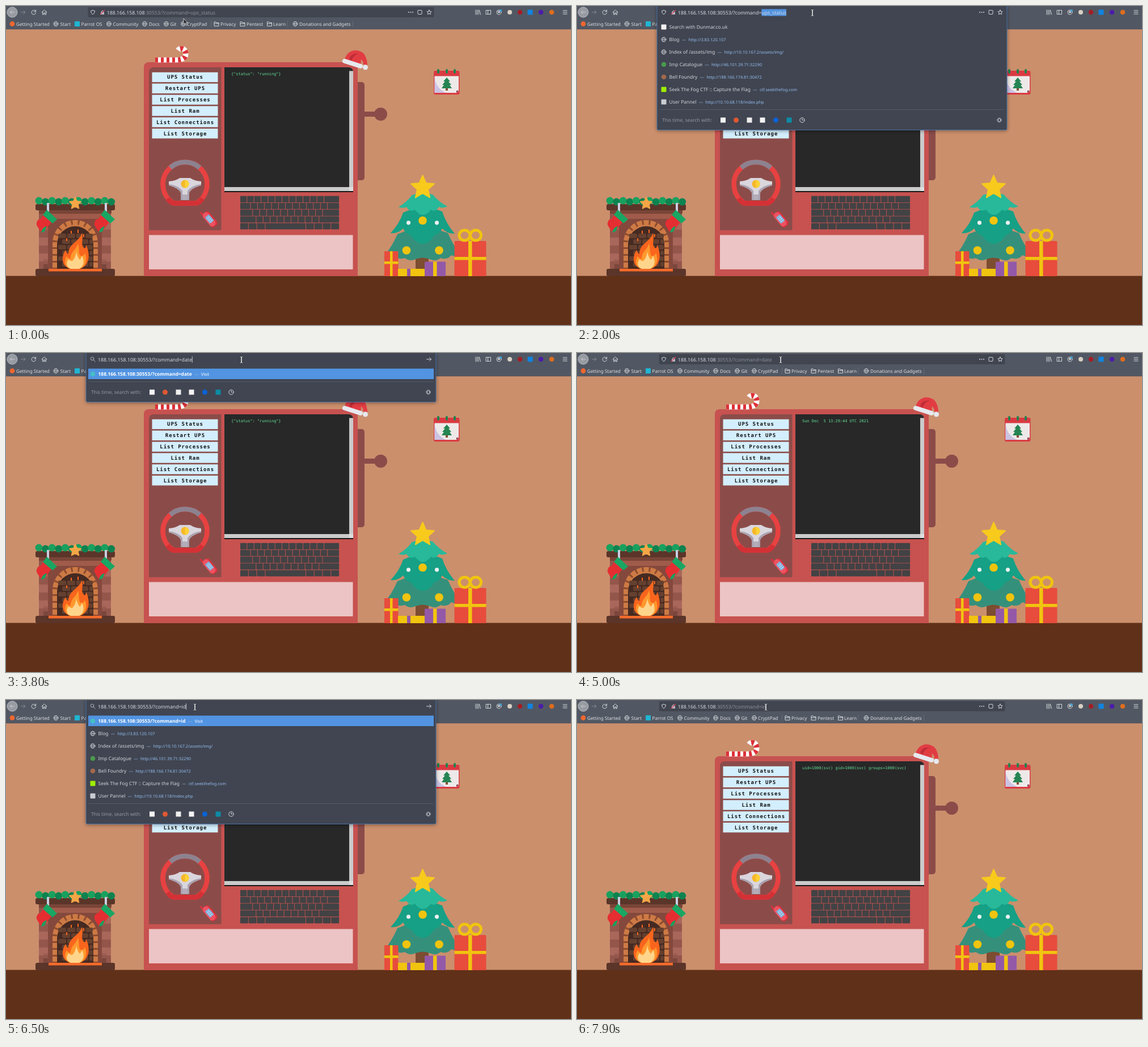
These frames come from a looping animation (996 by 562 pixels, 8000 ms). An HTML page:

```html
<!DOCTYPE html>
<html lang="en">
<head>
<meta charset="utf-8">
<title>Workshop console</title>
<style>
html, body { margin: 0; width: 100%; height: 100%; overflow: hidden; background: #cb8f6c; }
svg { display: block; width: 100vw; height: 100vh; }
text { font-family: "Noto Sans", sans-serif; text-rendering: geometricPrecision; white-space: pre; }
.marks { font-size: 8.2px; fill: #dcdfe4; }
.url { font-size: 8.73px; fill: #d6d9df; }
.row { font-size: 8.45px; fill: #d0d4da; }
.link { font-size: 7.4px; fill: #93bbec; }
.term { font: 6.94px "DejaVu Sans Mono", monospace; fill: #62df95; }
.btn { font: bold 9px "DejaVu Sans Mono", monospace; letter-spacing: .97px; text-anchor: middle; fill: #111; }
.line { fill: none; stroke: #d3d6db; stroke-width: 1; stroke-linecap: round; stroke-linejoin: round; }
#box { filter: drop-shadow(0 1px 3px #0006); }
</style>
</head>
<body>
<svg viewBox="0 0 996 562">
  <rect y="41" width="996" height="435" fill="#cb8f6c"/>
  <rect y="475.5" width="996" height="87" fill="#603018"/>

  <!-- fireplace -->
  <g>
    <rect x="58" y="355" width="127" height="110" fill="#84483c"/>
    <g id="pillars"></g>
    <path d="M82 464V417a40 40 0 0 1 80 0V464Z" fill="#cd7a45"/>
    <path d="M86 464V417a36 36 0 0 1 72 0V464" fill="none" stroke="#8d4b2d" stroke-width="8" stroke-dasharray="3 9"/>
    <path d="M90 464V420a32 32 0 0 1 64 0V464Z" fill="#452a22"/>
    <g id="bricks" fill="#65402f"></g>
    <path d="M134 400C137 412 131 418 137 426Q141 428 141 421C150 437 148 464 122 464C99 464 95 445 105 430Q107 436 110 437C110 418 128 417 134 400Z" fill="#f9651d"/>
    <path d="M127 418C130 430 127 434 131 440Q137 442 139 435C145 450 139 464 122 464S100 452 107 441Q110 446 114 445C114 432 124 430 127 418Z" fill="#ff982d"/>
    <path d="M124 432Q125 441 130 447Q133 444 134 440C140 452 136 464 122 464S104 456 110 446Q113 450 117 449Q123 443 124 432Z" fill="#ffd58c"/>
    <path d="M115 396v5M127 394v6M137 402v5M107 409v5" stroke="#f9651d" stroke-width="2"/>
    <rect x="58" y="359" width="128" height="7" rx="2" fill="#794538"/>
    <rect x="52" y="349" width="140" height="11" rx="3" fill="#5b3529"/>
    <rect x="52" y="463" width="140" height="13" rx="3" fill="#5b3529"/>
    <rect x="75" y="463" width="94" height="4.5" fill="#f56b2b"/>
    <g id="garland"></g>
    <g id="sock">
      <path d="M74 347v15" stroke="#c9cfe2" stroke-width="4"/>
      <path d="M67 366L81 380Q76 385 70 395Q65 401 60 396L54 386Q53 376 61 375Z" fill="#e52e32"/>
      <path d="M72 388l-3 8q-4 4-7 2Q65 389 72 388Z" fill="#18a15e"/>
      <path d="M72 359L90 376L82 383L65 368Z" fill="#19a663"/>
    </g>
    <use href="#sock" x="102"/>
  </g>

  <!-- console -->
  <path d="M243 476V107a8 8 0 0 1 8-8H612a8 8 0 0 1 8 8V476Z" fill="#c75250"/>
  <path d="M252 395V116a8 8 0 0 1 8-8H379.500V395Z" fill="#8b4c49"/>
  <path d="M620 134h7a5 5 0 0 1 5 5V302a5 5 0 0 1-5 5h-7ZM632 186h22v9h-22Z" fill="#8b4c49"/>
  <circle cx="660.500" cy="190.500" r="11.500" fill="#8b4c49"/>
  <g id="buttons"></g>
  <path d="M385 328V108H604a8 8 0 0 1 8 8V328Z" fill="#282828"/>
  <path d="M605 114.500h7V319h-7ZM385 319h220v7H385Z" fill="#cbcaca"/>
  <path d="M605 319h7v7h-7Z" fill="#dedede"/>
  <path d="M385 326h227v2H385Z" fill="#151515"/>
  <text id="out" class="term" x="397" y="121.700"></text>
  <g id="keys" fill="#424244"></g>
  <rect x="252" y="403.500" width="359.500" height="60.500" fill="#ecc4c5"/>
  <g fill="none" stroke-width="8.500">
    <path d="M295.500 347.500H335.500A39 39 0 1 0 295.500 347.500Z" stroke="#e84141"/>
    <path d="M285 339Q290 347.500 297 347.500H334Q341 347.500 346 339" stroke="#d43136"/>
    <path d="M289.500 285A39 39 0 0 1 341.500 285" stroke="#8d8290"/>
  </g>
  <path d="M287 309Q300 308 306 303H325Q331 308 344 309V316Q326 321 323 329V342H308V329Q305 321 287 316Z" fill="#dad6dd"/>
  <path d="M287 314Q304 316 311 326V342H308V329Q305 321 287 316ZM344 314Q327 316 320 326V342H323V329Q326 321 344 316Z" fill="#aaa2b0"/>
  <path d="M311 332h9v10h-9Z" fill="#b4adb9"/>
  <circle cx="315.500" cy="313.500" r="7" fill="#f6b729"/>
  <path d="M315.500 306.500a7 7 0 0 1 0 14Z" fill="#fbd236"/>
  <g transform="rotate(-40 359 375)">
    <rect x="352.500" y="355" width="3" height="10" rx="1.500" fill="#d9333f"/>
    <rect x="352" y="361" width="14" height="30" rx="5" fill="#d9333f"/>
    <rect x="352" y="361" width="11.500" height="28" rx="5" fill="#ef5260"/>
    <rect x="354" y="368" width="9" height="14" fill="#77a9d6"/>
    <path d="M354 372.500h9M354 376h9M354 379.500h9M357 368v14M360 368v14" stroke="#d5e9f8" stroke-width=".7"/>
  </g>
  <g fill="none" stroke-width="9">
    <path d="M263 95H300Q317 95 317 84Q316 75 309 75Q305 75 303 78" stroke="#fff"/>
    <path d="M263 95H300Q317 95 317 84Q316 75 309 75Q305 75 303 78" stroke="#dd3038" stroke-dasharray="5 5"/>
  </g>
  <path d="M596 97Q600 80 615 78Q636 78 637 104L630 103Q630 97 626 94L625 106Z" fill="#e23c43"/>
  <path d="M605 92Q610 82 622 84Q612 86 609 97Z" fill="#bd2d37"/>
  <path d="M597 97L625 106" stroke="#e6e9ef" stroke-width="8" stroke-linecap="round"/>
  <circle cx="633.500" cy="108" r="4.500" fill="#e6e9ef"/>

  <!-- calendar -->
  <rect x="754" y="114" width="45.500" height="42" rx="3" fill="#da3a42"/>
  <path d="M755.500 123.500H798V150L794 153H755.500Z" fill="#eee9e9"/>
  <path d="M755.500 123.500Q757 145 776 153H755.500Z" fill="#cbc3e3"/>
  <path d="M798 149h-4v4Z" fill="#7c3448"/>
  <g fill="#22824f"><rect x="760" y="111" width="4" height="8" rx="2"/><rect x="775" y="111" width="4" height="8" rx="2"/><rect x="789" y="111" width="4" height="8" rx="2"/></g>
  <path d="M775 144h4v5h-4Z" fill="#855035"/>
  <path d="M777 126L783 133H780L785 139H782L786 145H768L772 139H769L774 133H771Z" fill="#248452"/>

  <!-- tree -->
  <path d="M722 438h23v38h-23Z" fill="#7d4d31"/>
  <path d="M734 385L690 402Q680 425 666 441Q680 443 685 439Q690 448 703 444Q712 451 722 446Q734 441 747 446Q757 451 766 444Q778 448 785 439Q794 443 803 441Q790 425 779 400Z" fill="#35907b"/>
  <path d="M734 350L700 364Q694 383 678 400Q690 402 700 392Q705 402 714 404Q722 418 735 419Q747 418 755 404Q764 402 769 392Q779 402 791 401Q776 384 769 362Z" fill="#16a085"/>
  <path d="M734 328L716 333Q706 346 692 354Q700 357 706 354Q712 364 721 359Q728 368 735 368Q742 368 749 359Q757 364 763 354Q770 357 778 353Q764 346 752 332Z" fill="#27b99a"/>
  <g id="baubles"></g>

  <!-- presents -->
  <rect x="790.500" y="414" width="56" height="62" rx="2" fill="#e74c3c"/>
  <path d="M790.500 442h56v5.500h-56ZM815 414h6.500v62H815Z" fill="#f1c40f"/>
  <g fill="none" stroke="#f1c40f" stroke-width="5"><ellipse cx="808.500" cy="404" rx="9.500" ry="9"/><ellipse cx="828" cy="404" rx="9.500" ry="9"/></g>
  <rect x="667" y="432" width="24.500" height="44" rx="1" fill="#e74c3c"/>
  <path d="M667 450h24.500v4.500H667ZM677 432h4.500v44H677Z" fill="#f1c40f"/>
  <path d="M691 463h47v13h-47Z" fill="#f1c40f"/><path d="M707 463h6v13h-6Z" fill="#9058a6"/>
  <rect x="738" y="450.500" width="37" height="25.500" rx="1" fill="#9359a8"/>
  <path d="M753 450.500h6.500V476H753Z" fill="#f1c40f"/>

  <!-- browser bars -->
  <rect width="996" height="41" fill="#525863"/>
  <path d="M0 40.700h996" stroke="#4a4f5a" stroke-width=".6"/>
  <circle cx="11" cy="11" r="9" fill="#979ba2" stroke="#b9bcc1"/>
  <g class="line">
    <path d="M15 11H7.500M10.500 8l-3 3 3 3" stroke="#c9ccd0"/>
    <path d="M26.500 11H34M31 8l3 3-3 3" stroke="#858a93"/>
    <path id="reload" d="M51.600 8.500A3.800 3.800 0 1 0 52.600 12M52.500 7v3h-3"/>
    <path id="stop" d="M46 8l6 6M52 8l-6 6"/>
    <path d="M63 11l4.500-4 4.500 4M64.500 10.500V15h2v-3h2v3h2v-4.500"/>
    <path d="M828 7v8M830.500 7v8M833 7v8M834.500 7.500l2 7.500M846.500 7.500h8v7h-8ZM849.500 7.500v7M982 8h7M982 11h7M982 14h7"/>
    <circle cx="869" cy="11" r="4"/>
  </g>
  <circle cx="869" cy="10.500" r="2" fill="#d3d6db"/><circle cx="872" cy="8" r="2" fill="#3fa9e0"/>
  <circle cx="888" cy="11" r="4" fill="#d9d0c4"/>
  <circle cx="906" cy="11" r="4.200" fill="#a51d26"/>
  <rect x="919.500" y="6.500" width="9" height="9" fill="#1183e0"/>
  <circle cx="943" cy="11" r="4.300" fill="#4c1cab"/>
  <circle cx="962" cy="11" r="4.300" fill="#dd6d1e"/>
  <g id="bookmarks" class="marks"></g>

  <!-- address bar and its list -->
  <rect x="144.500" y="2" width="610" height="18" rx="2" fill="#404550"/>
  <g id="panel">
    <rect id="box" x="141" y="-3" width="617" rx="2.500" fill="#404551" stroke="#4f82c4" stroke-width=".8"/>
    <g id="list"></g>
  </g>
  <g id="site">
    <path class="line" d="M153 7.500q2 1 3.500 1 0 4.500-3.500 6.500-3.500-2-3.500-6.500 1.500 0 3.500-1Z"/>
    <rect x="167" y="10.500" width="6" height="4.500" fill="#b6bac1"/>
    <path class="line" d="M168.500 10.500v-1q1.500-3 3 0v1" stroke="#b6bac1"/>
    <path d="M166 15l8-8" stroke="#e2455e" stroke-width="1.200"/>
    <g fill="#d3d6db"><circle cx="710" cy="11" r="1"/><circle cx="713.500" cy="11" r="1"/><circle cx="717" cy="11" r="1"/></g>
    <rect x="726" y="7.500" width="7" height="7" rx="1" class="line"/>
    <path id="fav" class="line"/>
  </g>
  <g id="search" class="line"><circle cx="152" cy="10" r="2.800" stroke="#aeb2b9"/><path d="M154.300 12.300l3 3" stroke="#aeb2b9"/></g>
  <path id="go" class="line" d="M741.500 11h8M746.500 8l3 3-3 3"/>
  <rect id="sel" y="5.500" height="12" fill="#5294e2"/>
  <text id="url" class="url" y="14.500"><tspan>188.166.158.108</tspan><tspan id="rest"></tspan></text>
  <path id="caret" stroke="#e7e9ec" stroke-width=".8"/>

  <g id="status">
    <path d="M0 549.500H118q4 0 4 4V562H0Z" fill="#404550" stroke="#2f333c"/>
    <text x="4" y="559" style="font-size:7.6px" fill="#c9cdd3">Waiting for 188.166.158.108…</text>
  </g>

  <g id="mouse">
    <path id="arrow" d="M0 0V10.500L2.500 8.200 4.300 12.200 6 11.400 4.300 7.500H7.500Z" fill="#2b2d33" stroke="#e6e6e6" stroke-width=".8"/>
    <g id="beam" fill="none">
      <path d="M-2.200-5.500Q0-5.500 0-4V4Q0 5.500-2.200 5.500M2.200-5.500Q0-5.500 0-4V4Q0 5.500 2.200 5.500" stroke="#20242b" stroke-width="2.400"/>
      <path d="M-2.200-5.500Q0-5.500 0-4V4Q0 5.500-2.200 5.500M2.200-5.500Q0-5.500 0-4V4Q0 5.500 2.200 5.500" stroke="#fff"/>
    </g>
  </g>
</svg>
<script>
const $ = id => document.getElementById(id);
const rect = (x, y, w, h, fill, r = 0) =>
  `<rect x="${x}" y="${y}" width="${w}" height="${h}" rx="${r}"${fill ? ` fill="${fill}"` : ''}/>`;
const dot = (x, y, r, fill) => `<circle cx="${x}" cy="${y}" r="${r}" fill="${fill}"/>`;
const range = n => [...Array(n).keys()];
const globe = (x, y) => `<g class="line" style="stroke-width:.8"><circle cx="${x}" cy="${y}" r="4"/>
  <ellipse cx="${x}" cy="${y}" rx="1.800" ry="4"/><path d="M${x - 4} ${y}h8"/></g>`;
const folder = (x, y) => `<path class="line" d="M${x - 4} ${y + 3.500}v-7h3l1 1.500h4v5.500ZM${x - 4} ${y - .5}h8"/>`;
const starPath = (x, y, R, r) => 'M' + range(10).map(i => {
  const a = i * Math.PI / 5 - Math.PI / 2, d = i % 2 ? r : R;
  return `${x + d * Math.cos(a)} ${y + d * Math.sin(a)}`;
}).join('L') + 'Z';
const star = (x, y, R, r, fill) =>
  `<path d="${starPath(x, y, R, r)}" fill="${fill}" stroke="${fill}" stroke-width="2" stroke-linejoin="round"/>`;

function drawScene() {
  $('pillars').innerHTML = [58, 169].map(x => range(7).map(i =>
    rect(x, 366 + i * 14, 16, 14, i % 2 ? '#a9665a' : '#94564b') +
    rect(x === 58 ? 66 : x, 404 + i * 8.500, 8, 8, i % 2 ? '#9b5d52' : '#7b473d')).join('')).join('')
    + rect(66, 366, 112, 9, '#a05b4a');
  $('bricks').innerHTML = range(6).map(r => range(4).map(c => {
    const x = 92 + c * 16 + r % 2 * 7;
    return rect(x, 401 + r * 10, Math.min(14, 153 - x), 8, '', 2);
  }).join('')).join('');
  $('garland').innerHTML = range(12).map(i =>
    dot(58 + i * 11.600, 343 + i % 2 * 2, 6.500, i % 2 ? '#0d8350' : '#18a15e')).join('')
    + star(122, 348, 10.500, 5, '#f4a647');

  const labels = ['UPS Status', 'Restart UPS', 'List Processes', 'List Ram', 'List Connections', 'List Storage'];
  $('buttons').innerHTML = labels.map((s, i) => {
    const y = 116.800 + i * 19.850;
    return rect(257.500, y, 116, 17.300, '#d3eefd') + `<text class="btn" x="316" y="${y + 11.600}">${s}</text>`;
  }).join('');

  // each key row: widths in units, filled to the same total
  const ones = n => Array(n).fill(1);
  const rows = [[...ones(12), 2.200], [1.500, ...ones(11), 1.700], [1.800, ...ones(10), 2.400],
    [2.300, ...ones(9), 2.900], [1.200, 1.200, 1.200, 5.800, 1.200, 1.200, 1.200, 1.200]];
  $('keys').innerHTML = rows.map((row, i) => {
    const unit = 175 / row.reduce((a, b) => a + b);
    let x = 413;
    return row.map(w => {
      const key = rect(x, 334.800 + i * 11.900, w * unit - .9, 11.100, '', .8);
      x += w * unit;
      return key;
    }).join('');
  }).join('');

  $('baubles').innerHTML = star(734.500, 320, 21.500, 10, '#f8ca1c') + dot(734.500, 378, 7.300, '#f1c40f')
    + [706, 763.500].map(x => dot(x, 430.500, 7.300, '#f1c40f')).join('')
    + [709.500, 759.500].map(x => dot(x, 381.800, 3.600, '#ecf0f1')).join('');

  const marks = [['Getting Started', 11, 18, 'o'], ['Start', 88, 95.500, 'g'], ['Parrot OS', 125.500, 132.500, 's'],
    ['Community', 181.500, 188.500, 'g'], ['Docs', 244.500, 252, 'g'], ['Git', 282.500, 289.500, 'g'],
    ['CryptPad', 312.500, 319, 'g'], ['Privacy', 371, 378, 'f'], ['Pentest', 417, 424, 'f'],
    ['Learn', 464.500, 471, 'f'], ['Donations and Gadgets', 510, 517, 'g']];
  const icons = { g: x => globe(x, 31.500), f: x => folder(x, 31.500), o: x => dot(x, 31.500, 4.400, '#f0672f'),
    s: x => rect(x - 4.500, 27, 9, 9, '#20b5d3') };
  $('bookmarks').innerHTML = marks.map(([s, x, tx, k]) => icons[k](x) + `<text x="${tx}" y="34.600">${s}</text>`).join('')
    + [361, 495.500, 611].map(x => rect(x, 26, .7, 11, '#6f757f')).join('');
  $('fav').setAttribute('d', starPath(746, 11.300, 4.300, 2));
}

const square = fill => y => rect(148.500, y - 4.500, 9, 9, fill, 1);
const ball = fill => y => dot(153, y, 4.300, fill);
const visited = [
  ['Search with Dunmar.co.uk', '', square('#f1f1f1')],
  ['Blog', 'http://3.83.120.107', y => globe(153, y)],
  ['Index of /assets/img', 'http://10.10.167.2/assets/img/', y => globe(153, y)],
  ['Imp Catalogue', 'http://46.101.39.71:32290', ball('#4a9a4c')],
  ['Bell Foundry', 'http://188.166.174.81:30472', ball('#a4694c')],
  ['Seek The Fog CTF :: Capture the Flag', 'ctf.seekthefog.com', square('#9fef00')],
  ['User Pannel', 'http://10.10.68.118/index.php', square('#c9ccd1')]
];
const base = '188.166.158.108:30553/?command=';
const start = base.length;

function listMarkup(s) {
  const visit = s.typed ? [[base + s.cmd, 'Visit', ball('#45bfc5'), true]] : [];
  const items = visit.concat(visited.slice(visit.length, s.rows));
  const y0 = 28 + 22 * s.rows, y1 = y0 + 19;
  return items.map(([title, link, icon, hot], i) => {
    const y = 37 + 22 * i;
    const tail = link && `<tspan dx="4.300" class="link">—</tspan><tspan dx="4.300" class="link"${hot ? ' style="fill:#fff"' : ''}>${link}</tspan>`;
    return (hot ? rect(145, 27.500, 609, 18.500, '#5294e2') : '') + icon(y)
      + `<text class="row" x="162.500" y="${y + 3}"><tspan${hot ? ' font-weight="700" fill="#fff"' : ''}>${title}</tspan>${tail}</text>`;
  }).join('')
    + rect(146, y0, 607, .8, '#59606c')
    + `<text class="row" x="150" y="${y1 + 3}" style="fill:#949aa5">This time, search with:</text>`
    + rect(253, y1 - 4.500, 9, 9, '#f4f4f4') + dot(280.500, y1, 4.500, '#de5833')
    + rect(299.500, y1 - 4.500, 9, 9, '#eeeeee') + rect(322.500, y1 - 4.500, 9, 9, '#f4f4f4')
    + dot(350.500, y1, 4.500, '#0b62d6') + rect(369.500, y1 - 4.500, 9, 9, '#0d8ba5')
    + `<g class="line"><circle cx="397" cy="${y1}" r="4.200"/><path d="M397 ${y1 - 2.500}v2.500h2"/>
      <circle cx="744.500" cy="${y1}" r="2.500"/><circle cx="744.500" cy="${y1}" r="3.800" stroke-dasharray="1 2"/></g>`;
}

// [time in ms, what changes then]
const steps = [
  [0, { mouse: [313, 22], cmd: 'ups_status', out: '{"status": "running"}', rows: 0, sel: null, caret: false,
    focus: false, typed: false, loading: false, status: false }],
  ...[[314, 20], [317, 17], [320, 15], [323, 13], [326, 12], [327, 12]].map((mouse, i) => [100 + i * 100, { mouse }]),
  [700, { focus: true, sel: [0, start + 10] }],
  [800, { rows: 2 }],
  [900, { rows: 7 }],
  [1200, { sel: null, caret: true }],
  [1700, { mouse: [350, 12], sel: [start, start + 5], caret: false }],
  [1800, { mouse: [378, 12], sel: [start, start + 10] }],
  [1900, { mouse: [402, 12] }],
  [2000, { mouse: [415, 12] }],
  [3500, { typed: true, cmd: 'd', rows: 1, sel: null, caret: true }],
  [3600, { cmd: 'dat' }],
  [3800, { cmd: 'date' }],
  [4200, { typed: false, focus: false, rows: 0, caret: false, loading: true, status: true }],
  [4500, { out: 'Sun Dec\u00a0 5 13:29:44 UTC 2021', status: false }],
  [5000, { loading: false, mouse: [359, 12] }],
  [5200, { mouse: [333, 12.500] }],
  [5600, { focus: true, rows: 7, sel: [start, start + 4] }],
  [6500, { typed: true, cmd: 'id', sel: null, caret: true }],
  [6800, { focus: false, rows: 0, caret: false }],
  [7100, { typed: false, loading: true, status: true }],
  [7400, { out: 'uid=1000(svc) gid=1000(svc) groups=1000(svc)', status: false }],
  [7900, { loading: false }]
];

const show = (id, on) => $(id).setAttribute('visibility', on ? 'visible' : 'hidden');
const widthTo = n => n ? $('url').getSubStringLength(0, n) : 0;

function render(s) {
  const x = s.typed ? 162 : 177.700;
  $('out').textContent = s.out;
  $('url').setAttribute('x', x);
  $('rest').textContent = (base + s.cmd).slice(15);
  $('rest').style.fill = s.focus ? '' : '#8c929d';

  const height = s.rows ? 65 + 22 * s.rows : 22;
  $('box').setAttribute('height', height + 2.500);
  $('list').innerHTML = s.rows ? listMarkup(s) : '';
  show('panel', s.focus);
  show('site', !s.typed);
  show('search', s.typed);
  show('go', s.typed && s.focus);
  show('reload', !s.loading);
  show('stop', s.loading);
  show('status', s.status);

  show('sel', s.sel);
  if (s.sel) {
    const [a, b] = s.sel.map(widthTo);
    $('sel').setAttribute('x', x + a);
    $('sel').setAttribute('width', b - a);
  }
  show('caret', s.caret);
  const at = x + widthTo(s.typed ? start + s.cmd.length : start) + .4;
  $('caret').setAttribute('d', `M${at} 6v11`);

  const [mx, my] = s.mouse;
  $('mouse').setAttribute('transform', `translate(${mx} ${my})`);
  show('arrow', my > 20);
  show('beam', my <= 20);
}

let shown = -1;
function tick() {
  const t = performance.now() % 8000;
  const now = steps.filter(([at]) => at <= t).length;
  if (now !== shown) {
    shown = now;
    render(Object.assign({}, ...steps.slice(0, now).map(step => step[1])));
  }
  requestAnimationFrame(tick);
}

drawScene();
tick();
</script>
</body>
</html>
```
